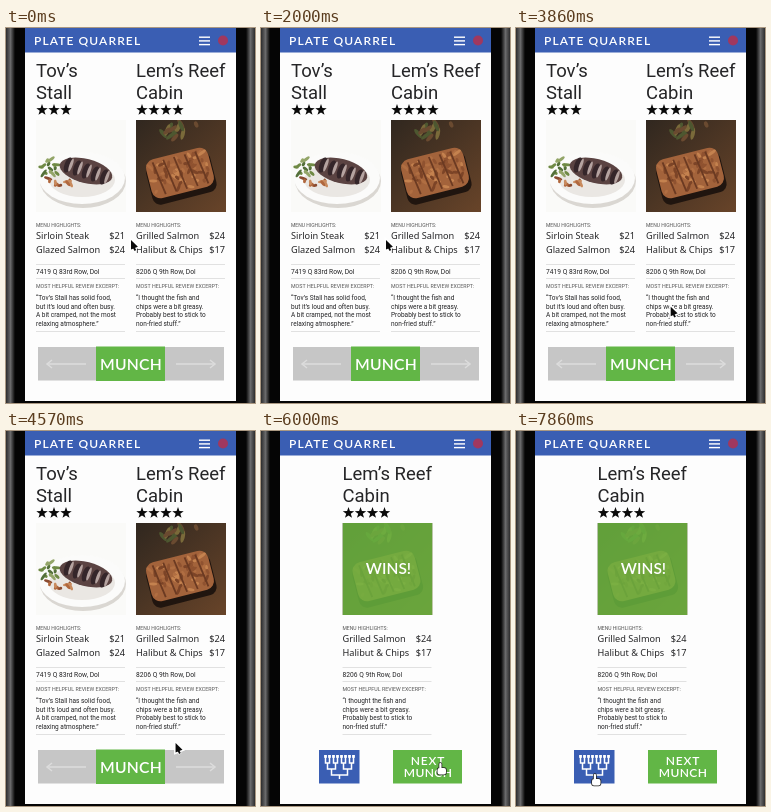
Write an HTML page with a canvas that moves like this. It is 249 px wide and 375 px high and loops after 8 s.

```html
<!DOCTYPE html>
<html lang="en">
<head>
<meta charset="utf-8">
<style>
html, body { margin: 0; width: 100%; height: 100%; overflow: hidden; background: #000; }
canvas { display: block; width: 100vw; height: 100vh; filter: blur(0.4px); }
</style>
</head>
<body>
<canvas id="stage"></canvas>
<script>
const W = 249, H = 375, LOOP = 8000, FPS = 7;
const MOVE_AT = 2430, CLICK_AT = 5000, WIN_AT = 6000, END_AT = 7860;
const canvas = document.getElementById('stage');
const c = canvas.getContext('2d');
const ROBOTO = 'Roboto, sans-serif', NOTO = '"Noto Sans", sans-serif', LATO = 'Lato, sans-serif';
const BLUE = '#3a5eb3', GREEN = '#62b646', INK = '#252527', WHITE = '#fff';

const places = [
  {
    name: ['Tov’s', 'Stall'], stars: 3, photo: steakPhoto,
    menu: [['Sirloin Steak', '$21'], ['Glazed Salmon', '$24']],
    address: '7419 Q 83rd Row, Dol',
    review: ['“Tov’s Stall has solid food,', 'but it’s loud and often busy.',
      'A bit cramped, not the most', 'relaxing atmosphere.”']
  },
  {
    name: ['Lem’s Reef', 'Cabin'], stars: 4, photo: salmonPhoto,
    menu: [['Grilled Salmon', '$24'], ['Halibut & Chips', '$17']],
    address: '8206 Q 9th Row, Dol',
    review: ['“I thought the fish and', 'chips were a bit greasy.',
      'Probably best to stick to', 'non-fried stuff.”']
  }
];

const lerp = (a, b, k) => a + (b - a) * k;
const progress = (t, from, to) => Math.min(1, Math.max(0, (t - from) / (to - from)));

function seeded(seed) {
  return () => (seed = seed * 16807 % 2147483647) / 2147483647;
}

function rect(x, y, w, h, color) {
  c.fillStyle = color;
  c.fillRect(x, y, w, h);
}

function oval(x, y, rx, ry, color, angle = 0) {
  c.fillStyle = color;
  c.beginPath();
  c.ellipse(x, y, rx, ry, angle, 0, Math.PI * 2);
  c.fill();
}

function line(color, width, ...points) {
  c.strokeStyle = color;
  c.lineWidth = width;
  c.beginPath();
  points.forEach(p => c.lineTo(...p));
  c.stroke();
}

function text(str, x, y, size, font, { color = INK, align = 'left', weight = 400, spacing = 0 } = {}) {
  c.font = `${weight} ${size}px ${font}`;
  c.letterSpacing = spacing + 'px';
  c.textAlign = align;
  c.fillStyle = color;
  c.fillText(str, x, y);
}

function label(str, x, y, size, spacing, align = 'center') {
  text(str, x, y, size, LATO, { color: WHITE, weight: 600, align, spacing });
}

function star(x, y, r) {
  c.fillStyle = '#0a0a0a';
  c.beginPath();
  for (let i = 0; i < 10; i++) {
    const a = i * Math.PI / 5 - Math.PI / 2, q = i % 2 ? r * 0.4 : r;
    c.lineTo(x + q * Math.cos(a), y + q * Math.sin(a));
  }
  c.fill();
}

// small tilted blobs strewn around a centre
function strew(rand, count, x, y, spreadX, spreadY, size, colors) {
  for (let i = 0; i < count; i++) {
    const px = x + (rand() - 0.5) * spreadX, py = y + (rand() - 0.5) * spreadY;
    oval(px, py, size * (0.6 + rand()), size * 0.5, colors[i % colors.length], rand() * 3);
  }
}

function steakPhoto() {
  const rand = seeded(11);
  rect(0, 0, 90, 92, '#fafaf8');
  oval(47, 61, 43, 27, '#dad7d2');
  oval(46, 58, 43, 26, '#fbfbfa');
  oval(46, 60, 33, 17, '#eae7e3');
  strew(rand, 14, 13, 48, 16, 18, 3, ['#6f8a45', '#93a568', '#54703a']);
  strew(rand, 10, 23, 62, 24, 8, 3, ['#b0673d', '#8a4b30', '#c98b5e']);
  oval(50, 51, 27, 12, '#5b4342', 0.25);
  for (let i = 0; i < 5; i++) {
    const x = 32 + i * 9, y = 45 + i * 3;
    oval(x, y, 3.5, 8, '#35262a', 0.35);
    oval(x + 3, y, 1.6, 7, '#b5a3a0', 0.35);
  }
}

function salmonPhoto() {
  const rand = seeded(5);
  const bg = c.createLinearGradient(0, 0, 90, 92);
  bg.addColorStop(0, '#30271f');
  bg.addColorStop(1, '#684429');
  rect(0, 0, 90, 92, bg);
  strew(rand, 14, 52, 11, 50, 16, 4, ['#4d5730', '#6a4a30', '#7a6a3a']);
  c.save();
  c.translate(44, 53);
  c.rotate(-0.25);
  c.beginPath();
  c.roundRect(-33, -16, 66, 42, 8);
  c.fillStyle = '#20150f';
  c.fill();
  c.beginPath();
  c.roundRect(-32, -20, 64, 40, 9);
  c.fillStyle = '#a3633b';
  c.fill();
  strew(rand, 60, 0, 0, 56, 32, 3, ['#c4824f', '#7c4427', '#b06e42', '#8f5230']);
  for (let x = -22; x <= 22; x += 11) line('#6b3a22', 1.8, [x - 2, -17], [x + 3, 17]);
  c.restore();
}

function winPhoto() {
  salmonPhoto();
  c.globalAlpha = 0.83;
  rect(0, 0, 90, 92, '#6cb940');
  c.globalAlpha = 1;
  label('WINS!', 46, 50.5, 15.5, 0);
}

function card(place, x, photo) {
  const right = x + 89;
  place.name.forEach((s, i) => text(s, x, 49 + i * 22, 18.5, ROBOTO));
  for (let i = 0; i < place.stars; i++) star(x + 6 + i * 12, 82, 6);
  c.save();
  c.beginPath();
  c.rect(x, 92, 90, 92);
  c.clip();
  c.translate(x, 92);
  photo();
  c.restore();
  text('MENU HIGHLIGHTS:', x, 199, 5, ROBOTO, { color: '#555' });
  place.menu.forEach(([dish, price], i) => {
    const y = 211 + i * 14;
    text(dish, x, y, 9.2, NOTO);
    text(price, right, y, 9.2, NOTO, { align: 'right' });
  });
  for (const y of [236, 250, 303]) rect(x, y, 89, 0.7, '#d6d6d6');
  text(place.address, x, 246, 6.7, ROBOTO);
  text('MOST HELPFUL REVIEW EXCERPT:', x, 260, 5.3, ROBOTO, { color: '#555' });
  place.review.forEach((s, i) => text(s, x, 272.3 + i * 8.5, 6.5, ROBOTO));
}

function bezel(outer, inner) {
  const shine = c.createLinearGradient(outer, 0, inner, 0);
  shine.addColorStop(0, '#2c2c2d');
  shine.addColorStop(0.5, '#6a6a6b');
  shine.addColorStop(1, '#050505');
  rect(Math.min(outer, inner), 0, Math.abs(inner - outer), H, shine);
}

function phone() {
  rect(0, 0, W, H, '#050505');
  bezel(0, 9);
  bezel(W, W - 9);
  rect(19, 0, 211, 373, '#fdfdfd');
  rect(19, 0, 211, 24.5, BLUE);
  label('PLATE QUARREL', 28, 17, 12, 1.1, 'left');
  for (let i = 0; i < 3; i++) rect(193, 8.5 + i * 3.7, 11, 1.4, WHITE);
  oval(217, 12.5, 5, 5, '#a0385f');
}

function sliderArrow(from, dir) {
  const tip = from + dir * 39, y = 336;
  line('#dcdcdc', 1.5, [from, y], [tip, y]);
  line('#dcdcdc', 1.5, [tip - dir * 5, y - 4], [tip, y], [tip - dir * 5, y + 4]);
}

function slider() {
  rect(32, 319, 186, 33.5, '#c6c6c6');
  sliderArrow(80, -1);
  sliderArrow(170, 1);
  rect(90, 318.5, 69, 34.5, GREEN);
  label('MUNCH', 125, 342, 15.7, 0.2);
}

// knockout tree: each level joins pairs of the one above
function bracketIcon() {
  for (let level = 0, gap = 4; level < 3; level++, gap *= 2) {
    const top = 326 + level * 6, first = 78.5 - 14 + (gap - 4) / 2;
    for (let x = first; x < 94; x += gap * 2) {
      line(WHITE, 1.5, [x, top], [x, top + 6], [x + gap, top + 6], [x + gap, top]);
      if (!level) [x, x + gap].forEach(px => rect(px - 1.4, 324, 2.8, 2.8, WHITE));
    }
  }
  line(WHITE, 1.5, [78.5, 344], [78.5, 348]);
}

function winButtons() {
  rect(58, 319, 40.5, 33.5, BLUE);
  bracketIcon();
  rect(132, 319, 69, 33.5, GREEN);
  label('NEXT', 167, 333.5, 12, 0.8);
  label('MUNCH', 167, 346, 12, 0.4);
}

function arrow(x, y) {
  line(WHITE, 3, [x + 2, y + 6], [x + 4.6, y + 11]);
  c.beginPath();
  [[0, 0], [0, 9.5], [6.9, 6.7]].forEach(([px, py]) => c.lineTo(x + px, y + py));
  c.closePath();
  c.stroke();
  c.fillStyle = '#0a0a0a';
  c.fill();
  line('#0a0a0a', 1.8, [x + 2, y + 6], [x + 4.4, y + 10.5]);
}

function hand(x, y) {
  c.beginPath();
  c.roundRect(x - 0.2, y, 2.2, 8, 1);
  c.roundRect(x - 2, y + 5, 8.5, 6.5, 2);
  c.strokeStyle = '#222';
  c.lineWidth = 1.5;
  c.stroke();
  c.fillStyle = WHITE;
  c.fill();
}

function cursor(t) {
  if (t < WIN_AT) {
    const k = progress(t, MOVE_AT, CLICK_AT);
    (t < 4700 ? arrow : hand)(lerp(125, 178.5, k), lerp(212, 332, k));
  } else {
    const k = 1 - (1 - progress(t, WIN_AT, END_AT)) ** 1.5;
    hand(lerp(178.5, 78, k), lerp(332, 343, k));
  }
}

function draw(t) {
  phone();
  if (t < WIN_AT) {
    places.forEach((p, i) => card(p, 30 + i * 100, p.photo));
    slider();
  } else {
    card(places[1], 81.5, winPhoto);
    winButtons();
  }
  cursor(t);
}

function tick(now) {
  const dpr = window.devicePixelRatio || 1;
  const w = Math.round(innerWidth * dpr), h = Math.round(innerHeight * dpr);
  if (canvas.width !== w || canvas.height !== h) {
    canvas.width = w;
    canvas.height = h;
  }
  c.setTransform(w / W, 0, 0, h / H, 0, 0);
  const step = Math.floor(((now % LOOP) + 4) * FPS / 1000);
  draw(step * 1000 / FPS % LOOP);
  requestAnimationFrame(tick);
}
requestAnimationFrame(tick);
</script>
</body>
</html>
```
